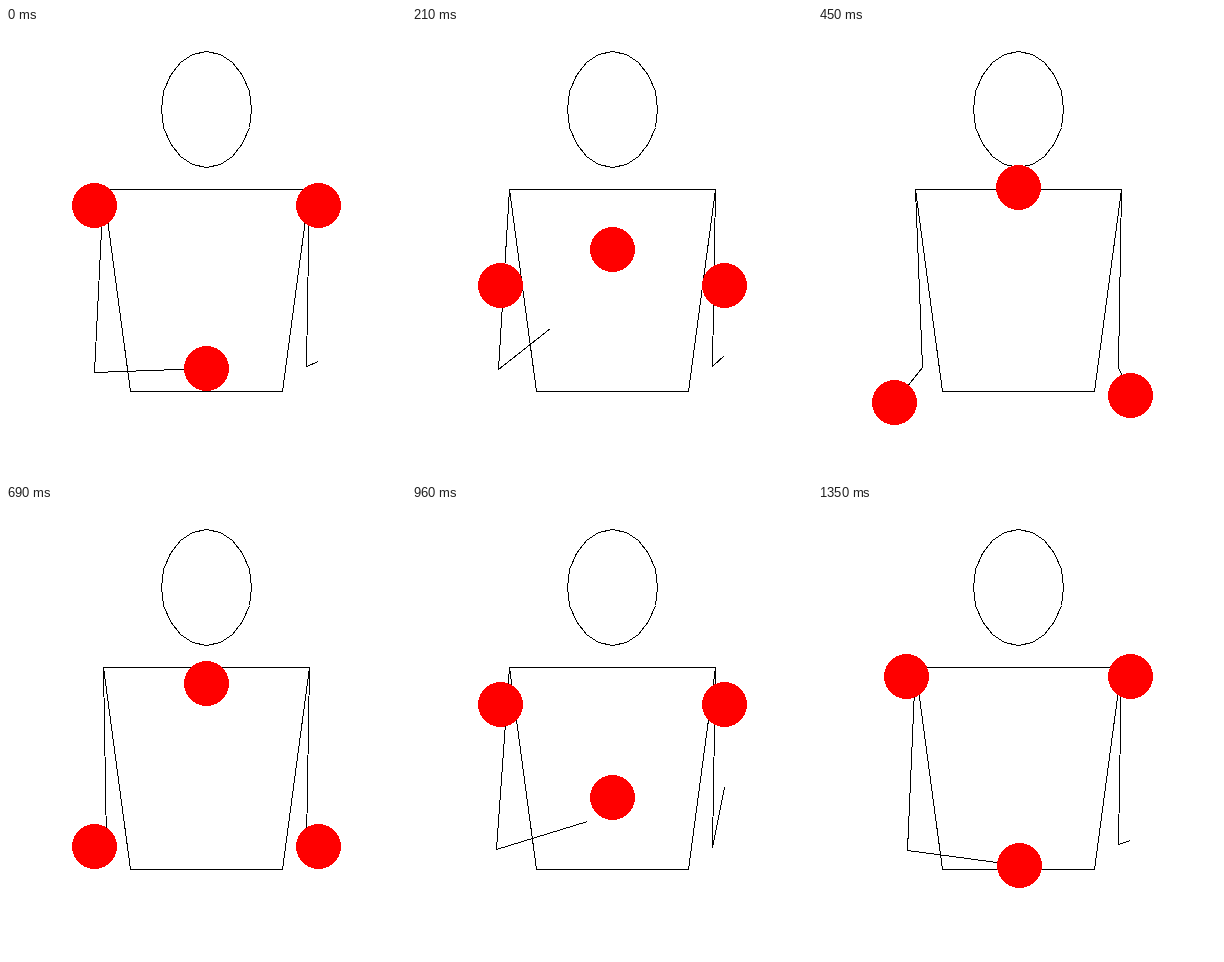
Recreate the animation shown at these times as an HTML page. Size 400x450 px, loop 1380 ms.

```html
<!DOCTYPE html>
<html lang="en">
<head>
<meta charset="utf-8">
<title>Three-ball columns</title>
<style>
  html, body { margin: 0; width: 100%; height: 100%; overflow: hidden; background: #fff; }
  svg { display: block; width: 400px; height: 450px; }
  .body { fill: none; stroke: #000; stroke-width: 1; shape-rendering: crispEdges; }
  .ball { fill: #f00; shape-rendering: crispEdges; }
</style>
</head>
<body>
<svg viewBox="0 0 400 450">
  <rect width="400" height="450" fill="#fff"/>
  <g class="body">
    <polygon id="head"/>
    <polygon id="torso"/>
    <polyline id="armL"/>
    <polyline id="armR"/>
  </g>
  <g class="ball">
    <circle id="ballL" r="22.5"/>
    <circle id="ballR" r="22.5"/>
    <circle id="ballC" r="22.5"/>
  </g>
</svg>
<script>
const LOOP = 1380, STEP = 30, DWELL = LOOP / 4, FLIGHT = LOOP - DWELL;
const SCALE = 4.478;              // pixels per body unit
const MID = 200, SIDE = 112, HAND_Y = 340.4, SHOULDER_Y = 161.3;
const PEAK = 184.3;               // height of a throw
const V = 4 * PEAK / FLIGHT;      // throw speed
const SWAY = 84 / DWELL;          // sideways speed at a catch
const DEPTH = 30, ARM = 41;       // hand distance and limb length, body units

const $ = id => document.getElementById(id);
const px = v => Math.round(v) + 0.5;
const points = list => list.map(([x, y]) => px(x) + "," + px(y)).join(" ");

// Hand knots: time, x, y, speed x, speed y
const left = [
  [0, MID, HAND_Y, 0, -V],
  [DWELL, MID - SIDE, HAND_Y, -SWAY, V / 2],
  [2 * DWELL, MID - SIDE, HAND_Y, 0, -V],
  [3 * DWELL, MID, HAND_Y, SWAY, V / 2],
  [LOOP, MID, HAND_Y, 0, -V]
];
const right = [
  [DWELL, MID + SIDE, HAND_Y, 0, 0.203],
  [2 * DWELL, MID + SIDE, HAND_Y, 0, -V],
  [3.5 * DWELL, MID + SIDE, HAND_Y - 12.5, 0, 0.1275],
  [5 * DWELL, MID + SIDE, HAND_Y, 0, 0.203]
];

function hermite(p, q, v, w, s, d) {
  const s2 = s * s, s3 = s2 * s, k = 3 * s2 - 2 * s3;
  return p + (q - p) * k + d * (v * (s - 2 * s2 + s3) + w * (s3 - s2));
}

function handAt(knots, t) {
  if (t < knots[0][0]) t += LOOP;
  let i = 0;
  while (i < knots.length - 2 && t >= knots[i + 1][0]) i++;
  const a = knots[i], b = knots[i + 1], d = b[0] - a[0], s = (t - a[0]) / d;
  return [1, 2].map(n => hermite(a[n], b[n], a[n + 2], b[n + 2], s, d));
}

// Ball flies up its column, then rides in the hand
function ballAt(x, thrown, hand, t) {
  const age = (t - thrown + LOOP) % LOOP;
  if (age >= FLIGHT) return hand;
  const u = 2 * age / FLIGHT - 1;
  return [x, HAND_Y - PEAK * (1 - u * u)];
}

// Elbow hangs below the line from shoulder to hand, solved in depth
function elbowAt(sx, [hx, hy]) {
  const dx = (hx - sx) / SCALE, dz = (SHOULDER_Y - hy) / SCALE;
  const flat = Math.hypot(dx, DEPTH), dist = Math.hypot(flat, dz);
  const half = dist / 2, drop = Math.sqrt(Math.max(0, ARM * ARM - half * half));
  const factor = 1 + drop * dz / (flat * half);
  return [
    sx + SCALE * dx / 2 * factor,
    SHOULDER_Y - SCALE * (dz / 2 - drop * flat / dist)
  ];
}

function setArm(id, sx, hand) {
  $(id).setAttribute("points", points([[sx, SHOULDER_Y], elbowAt(sx, hand), hand]));
}

function setBall(id, [x, y]) {
  $(id).setAttribute("cx", px(x));
  $(id).setAttribute("cy", px(y));
}

function draw(t) {
  const l = handAt(left, t), r = handAt(right, t);
  setArm("armL", MID - 103, l);
  setArm("armR", MID + 103, r);
  setBall("ballL", ballAt(MID - SIDE, 2 * DWELL, l, t));
  setBall("ballR", ballAt(MID + SIDE, 2 * DWELL, r, t));
  setBall("ballC", ballAt(MID, 0, l, t));
}

const head = Array.from({ length: 20 }, (_, i) => {
  const a = i * Math.PI / 10;
  return [MID + 45 * Math.cos(a), 81 + 58 * Math.sin(a)];
});
$("head").setAttribute("points", points(head));
$("torso").setAttribute("points", points([
  [MID - 103, SHOULDER_Y], [MID + 103, SHOULDER_Y], [MID + 76, 363], [MID - 76, 363]
]));

let start = null;
function tick(now) {
  if (start === null) start = now;
  const t = Math.max(0, now - start) % LOOP;
  draw(Math.floor(t / STEP) * STEP);
  requestAnimationFrame(tick);
}
draw(0);
requestAnimationFrame(tick);
</script>
</body>
</html>
```
